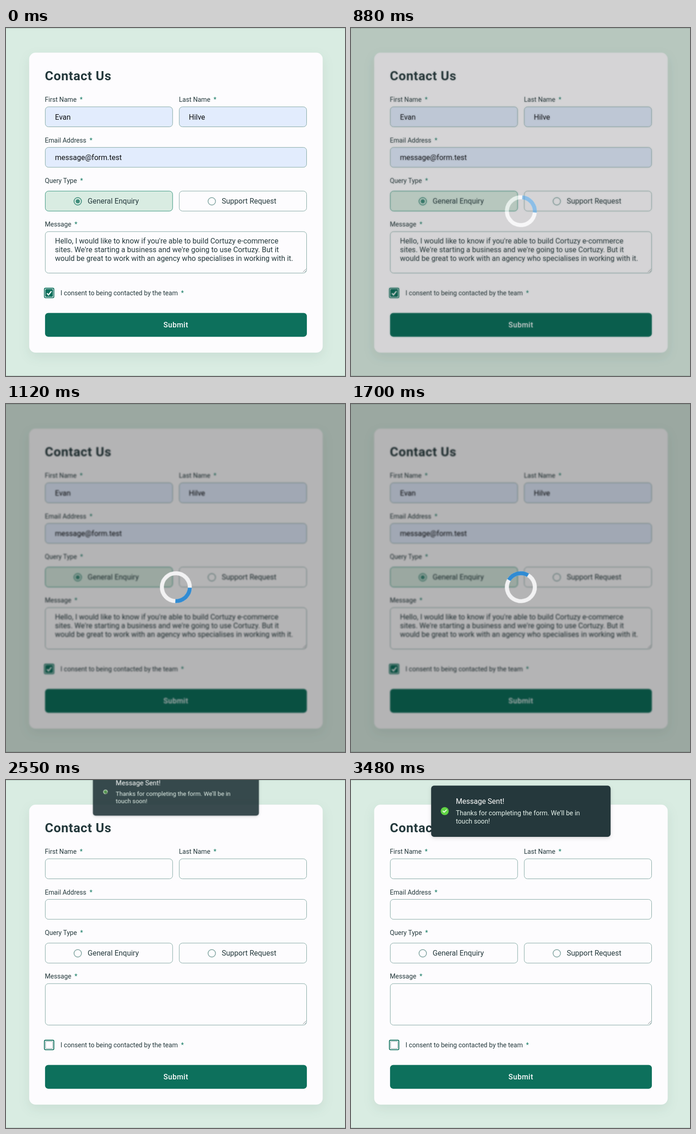
Recreate the animation shown at these times as an HTML page. Size 737 by 759 pixels, loop 3.51 s.

```html
<!DOCTYPE html>
<html lang="en">
<head>
<meta charset="utf-8">
<title>Contact form</title>
<style>
  html, body { margin: 0; width: 100%; height: 100%; overflow: hidden; background: #d9ece2; }
  .stage { position: relative; width: 737px; height: 759px; overflow: hidden; }
  .stage > * { position: absolute; inset: 0; }
  svg { display: block; width: 737px; height: 759px; }
  text { font: 400 16px Roboto, sans-serif; fill: #24393c; }
  .title { font-weight: 700; font-size: 28px; letter-spacing: .65px; }
  .label { font-size: 14.1px; }
  .label tspan { fill: #147a63; }
  .value { fill: #0b0d10; }
  .submit { font-weight: 500; letter-spacing: .5px; fill: #fdfcfe; text-anchor: middle; }
  .card { fill: #fdfcfe; filter: drop-shadow(0 9px 12px rgba(20, 60, 50, .08)); }
  .field { fill: none; stroke: #7fa5a0; }
  .auto { fill: #e2ecfd; }
  .picked { fill: #d9ece2; stroke: #2f9079; }
  .radio { fill: none; stroke: #86a8a5; stroke-width: 1.7; }
  .radio.on { stroke: #3f8d7b; }
  .green { fill: #0d705c; }
  .overlay { background: rgba(0, 0, 0, .285); backdrop-filter: blur(1.75px); opacity: 0; }
  .ring { fill: none; stroke: #f2f2f3; stroke-width: 8.8; }
  .arc { stroke: #308bd3; stroke-dasharray: 1 3; }
  #spin { transform-origin: 369.3px 399.5px; }
  #toast { transform-origin: 369.3px 68.3px; opacity: 0; }
  #toast > rect { fill: #25383c; filter: drop-shadow(0 3px 5px rgba(0, 0, 0, .1)) drop-shadow(0 2px 2px rgba(0, 0, 0, .06)); }
  #toast text { fill: #fff; }
  #toast .body { font-size: 14.2px; fill: #e6f3ec; }
  #badge, #loader { transform-origin: 10px 10px; }
  .edges { border: solid rgba(20, 50, 45, .2); border-width: 1px 0; }
</style>
</head>
<body>
<div class="stage">
  <svg viewBox="0 0 737 759">
    <rect class="card" x="50.4" y="53.8" width="638.1" height="654.3" rx="14"/>
    <text class="title" x="84.5" y="114">Contact Us</text>

    <g id="labels"></g>

    <rect x="83.5" y="567.5" width="20.6" height="20.8" rx="2.5" fill="none" stroke="#0d705c" stroke-width="1.8"/>
    <rect x="86" y="570" width="15.6" height="15.8" rx="1.5" fill="none" stroke="#7fa29d"/>

    <rect class="green" x="84.9" y="621.4" width="569.2" height="52" rx="7"/>
    <text class="submit" x="369.3" y="652.8">Submit</text>

    <g id="filled">
      <rect class="auto" x="85.4" y="171.9" width="276.8" height="43.6" rx="7"/>
      <rect class="auto" x="376.7" y="171.9" width="276.8" height="43.6" rx="7"/>
      <rect class="auto" x="85.4" y="260.4" width="568.1" height="43.4" rx="7"/>
      <rect class="picked" x="85.4" y="355.7" width="276.8" height="43.6" rx="7"/>
      <text class="value" x="106.5" y="200">Evan</text>
      <text class="value" x="397.5" y="200">Hilve</text>
      <text class="value" x="106.5" y="288">message@form.test</text>
      <circle cx="156" cy="378" r="4.6" fill="#3f8d7b"/>
      <circle class="radio on" cx="156" cy="378" r="8.1"/>
      <text x="106.5" y="470">Hello, I would like to know if you're able to build Cortuzy e-commerce</text>
      <text x="106.5" y="489">sites. We're starting a business and we're going to use Cortuzy. But it</text>
      <text x="106.5" y="508">would be great to work with an agency who specialises in working with it.</text>
      <rect class="green" x="85.6" y="569.6" width="16.4" height="16.6" rx="2"/>
      <path d="M89 578.6l3.4 3.5 6.4-8.2" fill="none" stroke="#fff" stroke-width="2.4"/>
    </g>

    <g id="unpicked">
      <rect class="field" x="85.4" y="355.7" width="276.8" height="43.6" rx="7"/>
      <circle class="radio" cx="156" cy="378" r="8.1"/>
    </g>
    <rect class="field" x="85.4" y="171.9" width="276.8" height="43.6" rx="7"/>
    <rect class="field" x="376.7" y="171.9" width="276.8" height="43.6" rx="7"/>
    <rect class="field" x="85.4" y="260.4" width="568.1" height="43.4" rx="7"/>
    <rect class="field" x="376.7" y="355.7" width="276.8" height="43.6" rx="7"/>
    <rect class="field" x="85.4" y="444.1" width="568.1" height="90.4" rx="7"/>
    <path d="M645.5 532.5l7-7M649.5 532.5l3-3" fill="none" stroke="#7d8a8c"/>

    <circle class="radio" cx="447.4" cy="378" r="8.1"/>
    <text x="177.5" y="383.3">General Enquiry</text>
    <text x="469" y="383.3">Support Request</text>
  </svg>

  <div class="overlay" id="overlay">
    <svg viewBox="0 0 737 759">
      <g id="spin">
        <circle class="ring" cx="369.3" cy="399.5" r="30.4"/>
        <circle class="ring arc" cx="369.3" cy="399.5" r="30.4" pathLength="4" transform="rotate(-135 369.3 399.5)"/>
      </g>
    </svg>
  </div>

  <svg viewBox="0 0 737 759">
    <g id="toast">
      <rect x="174.2" y="12.3" width="390.2" height="111.6" rx="6.5"/>
      <text x="228" y="51.8">Message Sent!</text>
      <text class="body" x="228" y="76.6">Thanks for completing the form. We’ll be in</text>
      <text class="body" x="228" y="94.8">touch soon!</text>
      <g transform="translate(203.7 67.8) scale(.876) translate(-10 -10)" fill="none" stroke-width="2">
        <g id="loader">
          <circle cx="10" cy="10" r="5" stroke="#e0e0e0"/>
          <path d="M13.5 6.5a5 5 0 0 1 0 7" stroke="#616161"/>
        </g>
        <circle id="badge" cx="10" cy="10" r="10" fill="#61d345"/>
        <path id="tick" d="M6 13h5V4" transform="rotate(45 10 10)" stroke="#fff" stroke-dasharray="14 20"/>
      </g>
    </g>
  </svg>

  <div class="edges"></div>
</div>

<script>
  const LOOP = 3510, LOAD = 785, DONE = 2410, TOAST = 2416;
  const $ = id => document.getElementById(id);

  const labels = [
    [84.5, 161, 'First Name'], [376, 161, 'Last Name'], [84.5, 249.5, 'Email Address'],
    [84.5, 338, 'Query Type'], [84.5, 433.3, 'Message'],
    [118.5, 583.4, 'I consent to being contacted by the team'],
  ];
  $('labels').innerHTML = labels.map(([x, y, s]) =>
    `<text class="label" x="${x}" y="${y}">${s}<tspan dx="7">*</tspan></text>`).join('');

  // Steps are [ms, properties, easing]; the end states are held to fill the loop.
  function play(id, steps) {
    const last = steps[steps.length - 1];
    const all = [[0, steps[0][1]], ...steps, [LOOP, last[1]]];
    $(id).animate(
      all.map(([ms, props, easing = 'linear']) => ({ offset: ms / LOOP, easing, ...props })),
      { duration: LOOP, iterations: Infinity });
  }

  const fade = opacity => ({ opacity });
  const turn = ms => ({ transform: `rotate(${ms * .36}deg)` });
  const pose = (opacity, y, scale) => ({ opacity, transform: `translateY(${y}px) scale(${scale})` });
  const stroke = (opacity, length) => ({ opacity, strokeDashoffset: 14 - length });

  play('filled', [[DONE, fade(1)], [DONE, fade(0)]]);
  play('unpicked', [[DONE, fade(0)], [DONE, fade(1)]]);
  play('overlay', [[LOAD, fade(0), 'ease'], [LOAD + 300, fade(1)], [DONE, fade(1)], [DONE, fade(0)]]);
  play('spin', [[0, turn(-740)], [LOOP, turn(LOOP - 740)]]);
  play('toast', [
    [TOAST, pose(0, -223, .6)],
    [TOAST, pose(.5, -223, .6), 'cubic-bezier(.21, 1.02, .73, 1)'],
    [TOAST + 350, pose(1, 0, 1)],
  ]);
  play('loader', [[TOAST, turn(0)], [LOOP, turn(LOOP - TOAST)]]);
  play('badge', [
    [TOAST + 100, pose(0, 0, 0), 'cubic-bezier(.175, .885, .32, 1.275)'],
    [TOAST + 400, pose(1, 0, 1)],
  ]);
  play('tick', [
    [TOAST + 200, stroke(0, 0), 'ease-out'],
    [TOAST + 280, stroke(1, 5), 'ease-out'],
    [TOAST + 400, stroke(1, 14)],
  ]);
</script>
</body>
</html>
```
